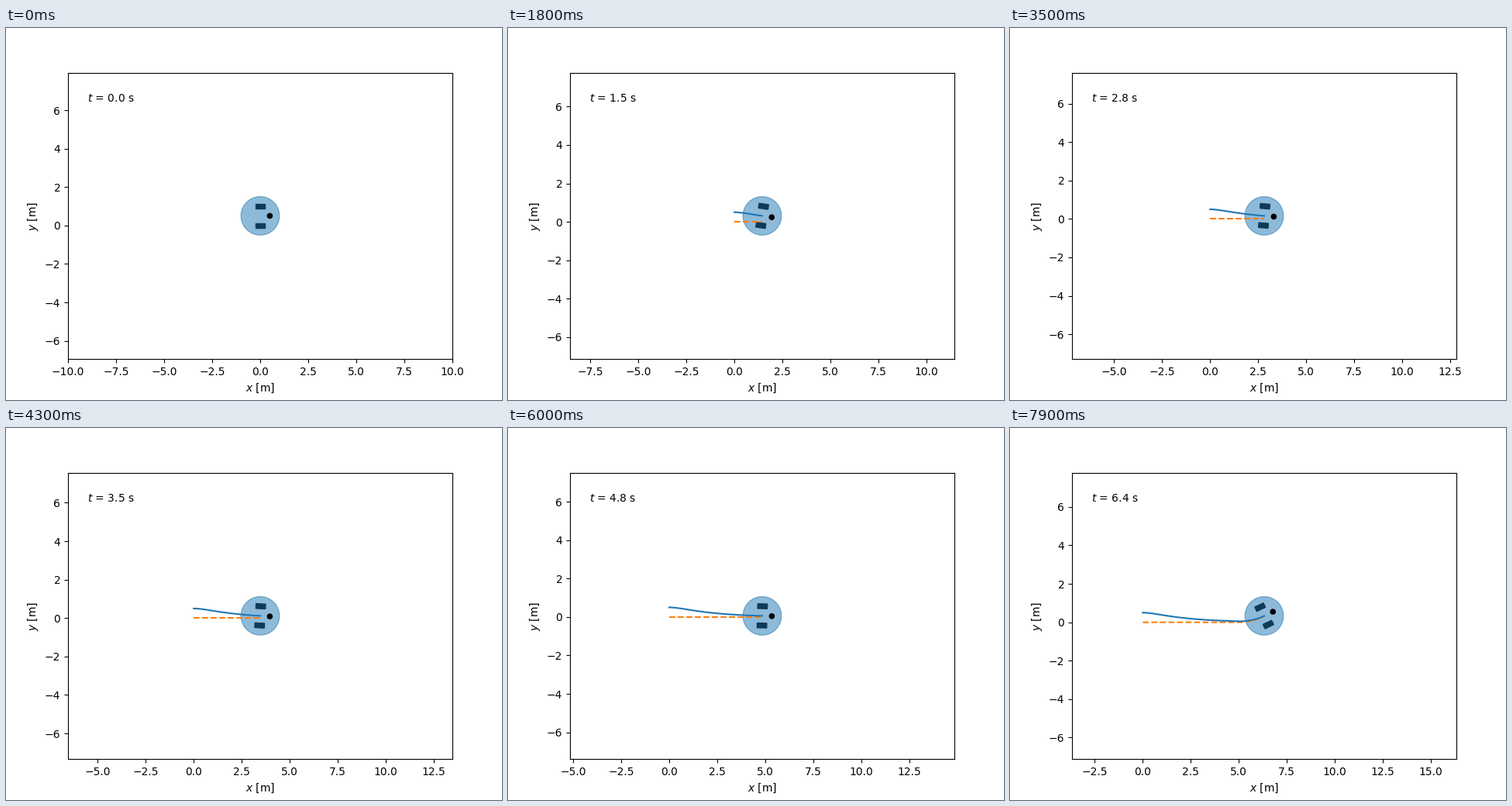
Animation of 640 by 480 pixels, one loop 8000 ms. Source, as a matplotlib script:

```python
import numpy as np
import matplotlib.pyplot as plt
from matplotlib.animation import FuncAnimation

FRAMES = 80
DT = 10 / 124        # simulated seconds per step
SUB = 40             # integration substeps
T_TURN = 5.0         # the plan is straight, then turns left
RATE = 1 / 3         # turn rate, rad/s
ELL = 1.0            # wheel track, m
HALF_W = 10.0
HALF_H = HALF_W * 369.6 / 496


def plan(t):
    """Planned pose at unit speed: a line followed by an arc."""
    if t <= T_TURN:
        return t, 0.0, 0.0, 0.0
    a = RATE * (t - T_TURN)
    return T_TURN + np.sin(a) / RATE, (1 - np.cos(a)) / RATE, a, RATE


def derivative(t, pose):
    """Differential-drive kinematics under linear feedback."""
    xd, yd, ad, wd = plan(t)
    x, y, a = pose
    c, s = np.cos(ad), np.sin(ad)
    along = c * (x - xd) + s * (y - yd)
    across = -s * (x - xd) + c * (y - yd)
    v = 1 - along
    w = wd - across - 2.5 * (a - ad)
    return np.array([v * np.cos(a), v * np.sin(a), w])


def simulate():
    pose = np.array([0.0, 0.5, 0.0])
    poses = [pose]
    h = DT / SUB
    for k in range((FRAMES - 1) * SUB):
        t = k * h
        mid = pose + h / 2 * derivative(t, pose)
        pose = pose + h * derivative(t + h / 2, mid)
        if (k + 1) % SUB == 0:
            poses.append(pose)
    return np.array(poses)


def place(points, pose):
    """Rotate and shift body points to the pose."""
    x, y, a = pose
    c, s = np.cos(a), np.sin(a)
    return points @ np.array([[c, s], [-s, c]]) + (x, y)


def circle(cx, cy, r, n=100):
    a = np.linspace(0, 2 * np.pi, n)
    return np.column_stack([cx + r * np.cos(a), cy + r * np.sin(a)])


def rectangle(cx, cy, w, h):
    return np.array([[cx + i * w / 2, cy + j * h / 2]
                     for i, j in [(-1, -1), (1, -1), (1, 1), (-1, 1)]])


poses = simulate()
planned = np.array([plan(k * DT)[:2] for k in range(FRAMES)])

fig, ax = plt.subplots(figsize=(6.4, 4.8), dpi=100)
ax.set_xlabel(r"$x$ [m]")
ax.set_ylabel(r"$y$ [m]")

shapes = [
    (rectangle(0, ELL / 2, ELL / 2, ELL / 4), dict(color="k")),
    (rectangle(0, -ELL / 2, ELL / 2, ELL / 4), dict(color="k")),
    (circle(0, 0, ELL), dict(color="C0", alpha=0.5)),
    (circle(ELL / 2, 0, ELL / 8), dict(color="k")),
]
patches = [ax.fill(*pts.T, **style)[0] for pts, style in shapes]
dashed, = ax.plot([], [], "--C1")
trail, = ax.plot([], [], "C0")
clock = ax.text(0.05, 0.9, "", transform=ax.transAxes)


def draw(k):
    x, y, _ = poses[k]
    dashed.set_data(*planned[:k + 1].T)
    trail.set_data(*poses[:k + 1, :2].T)
    for patch, (pts, _) in zip(patches, shapes):
        patch.set_xy(place(pts, poses[k]))
    clock.set_text(rf"$t$ = {k * DT:.1f} s")
    ax.set_xlim(x - HALF_W, x + HALF_W)
    ax.set_ylim(y - HALF_H, y + HALF_H)
    return [dashed, trail, clock, *patches]


ani = FuncAnimation(fig, draw, frames=FRAMES, interval=100,
                    repeat=True, repeat_delay=0, blit=False)
plt.show()
```
